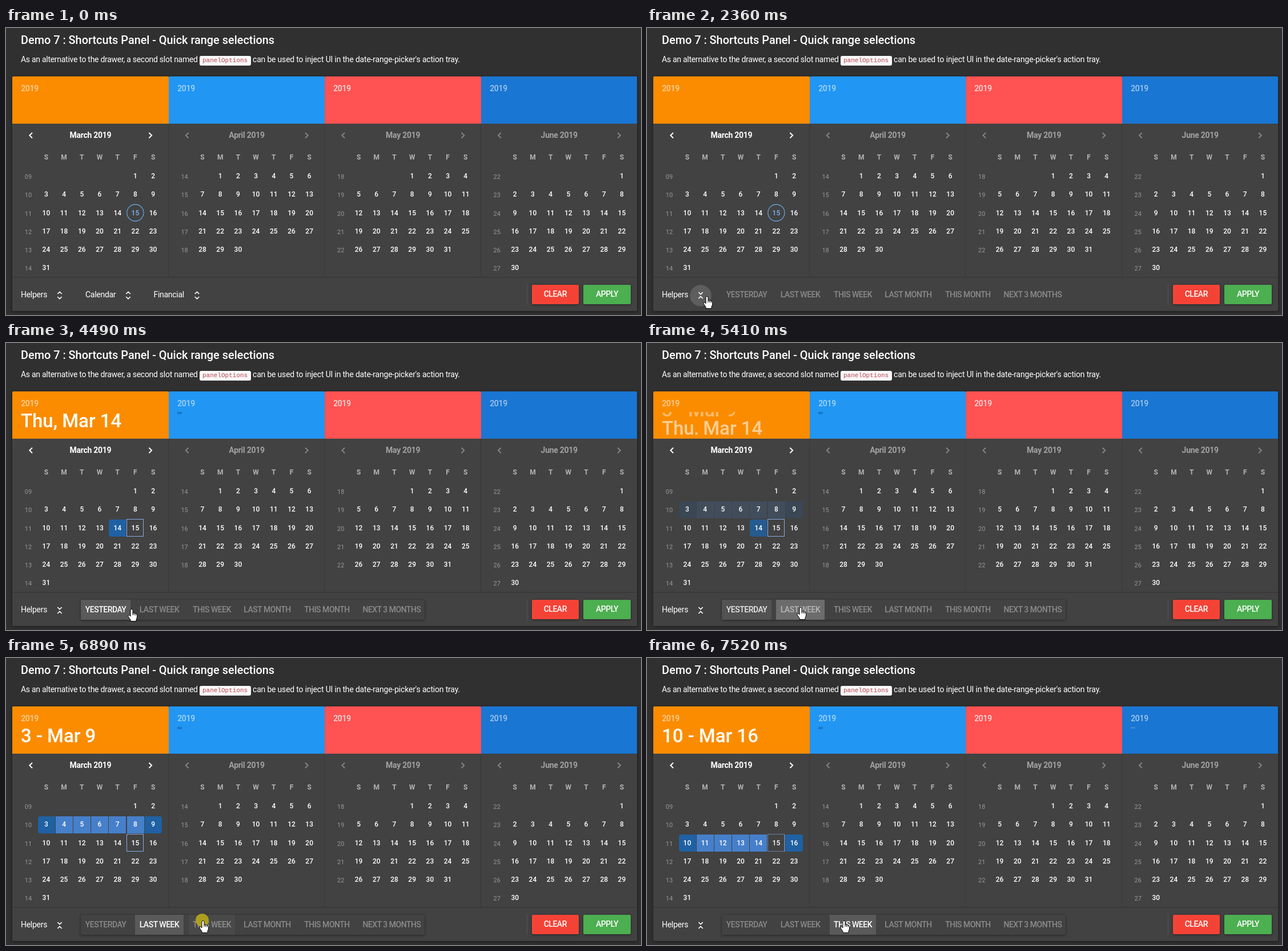
Animation, 1112 px wide and 504 px high, one loop 8 s. Source, as an HTML page:

```html
<!DOCTYPE html>
<html lang="en">
<head>
<meta charset="utf-8">
<title>Shortcuts Panel</title>
<style>
  html, body { margin: 0; width: 100%; height: 100%; overflow: hidden; background: #303030; }
  svg { display: block; width: 1112px; height: 504px; font-family: Roboto, sans-serif; fill: #fff; }
  .mid { text-anchor: middle; }
  .tight { letter-spacing: -.28px; }
  .caps { letter-spacing: -.48px; text-anchor: middle; }
  .shade { filter: drop-shadow(0 1px 2px rgba(0, 0, 0, .45)); }
  .line { fill: none; stroke: #fff; }
</style>
</head>
<body>
<svg viewBox="0 0 1112 504" xmlns="http://www.w3.org/2000/svg">
  <defs><clipPath id="titleClip"><rect x="12" y="121" width="272" height="40"/></clipPath></defs>
  <g id="base"></g>
  <g id="cells"></g>
  <g id="dates"></g>
  <g id="live"></g>
</svg>
<script>
const LOOP = 8000;
const PITCH = 273.6, COL = 31.2, ROW = 32.1;
const OPEN = 1980;
const $ = id => document.getElementById(id);
const clamp = v => Math.max(0, Math.min(1, v));
const ramp = (t, start, dur) => clamp((t - start) / dur);
const easeOut = u => 1 - (1 - u) ** 2;

const panels = [
  { name: 'March 2019', color: '#fb8c00', first: 5, days: 31, week: 9 },
  { name: 'April 2019', color: '#2196f3', first: 1, days: 30, week: 14 },
  { name: 'May 2019', color: '#ff5252', first: 3, days: 31, week: 18 },
  { name: 'June 2019', color: '#1976d2', first: 6, days: 30, week: 22 }
];

// dir: 1 enters from below, -1 from above
const picks = [
  { at: 3600, text: 'Thu, Mar 14', dir: 1, row: 2, from: 4, to: 4 },
  { at: 5340, text: '3 - Mar 9', dir: -1, row: 1, from: 0, to: 6 },
  { at: 7120, text: '10 - Mar 16', dir: 1, row: 2, from: 0, to: 6 }
];

const shortcuts = [
  ['YESTERDAY', 131, 218], ['LAST WEEK', 226, 311], ['THIS WEEK', 320, 401],
  ['LAST MONTH', 409, 506], ['THIS MONTH', 514, 610], ['NEXT 3 MONTHS', 618, 733]
];

// start, end, steps of each burst of screen updates
const bursts = [
  [0, 0, 1], [500, 820, 5], [970, 1430, 7], [1910, 2130, 4], [2290, 2360, 2],
  [2600, 3070, 6], [3240, 3320, 2], [3630, 3940, 5], [4250, 4250, 1],
  [4490, 4720, 4], [5100, 5100, 1], [5260, 5730, 7], [6050, 6050, 1],
  [6200, 6660, 7], [6890, 6890, 1], [7040, 7520, 7]
];

// time, x, y of the pointer tip
const path = [
  [500, 955, 484], [580, 720, 440], [660, 440, 414], [740, 190, 440], [820, 35, 480],
  [970, 12, 482], [1047, 45, 488], [1123, 82, 486], [1200, 102, 478], [1277, 111, 468],
  [1430, 105, 471], [2520, 105, 471], [2760, 130, 473], [2920, 190, 456], [3070, 193, 463],
  [4410, 193, 463], [4490, 220, 467], [4640, 256, 468], [4720, 269, 464], [6120, 269, 464],
  [6200, 278, 464], [6430, 332, 464], [6550, 356, 463], [6660, 345, 461]
];

const clicks = [[1910, 1980], [3320, 3630], [5100, 5260], [6890, 7040]];

function text(x, y, size, weight, str, attrs = '') {
  return `<text x="${x}" y="${y}" font-size="${size}" font-weight="${weight}" ${attrs}>${str}</text>`;
}
const centered = (x, y, size, weight, str, attrs = '') =>
  text(x, y, size, weight, str, `class="mid" ${attrs}`);
const label = (x, y, weight, str, attrs = '') => text(x, y, 14, weight, str, `class="tight" ${attrs}`);
const caps = (x, y, str, attrs = '') => text(x, y, 14, 500, str, `class="caps" ${attrs}`);
const rect = (x, y, w, h, fill, attrs = '') =>
  `<rect x="${x}" y="${y}" width="${w}" height="${h}" fill="${fill}" ${attrs}/>`;
const line = (d, width, attrs = '') => `<path class="line" d="${d}" stroke-width="${width}" ${attrs}/>`;

const edge = i => Math.round(11.2 + i * 273.5);
const colX = c => 70.4 + c * COL;
const rowY = r => 260 + r * ROW;

function unfold(x, less) {
  const [a, b] = less ? [464, 475] : [467, 472];
  const [ta, tb] = less ? [467.5, 471.5] : [463.5, 475.5];
  return line(`M${x - 3.7} ${a}L${x} ${ta}L${x + 3.7} ${a}M${x - 3.7} ${b}L${x} ${tb}L${x + 3.7} ${b}`, 1.7);
}

function drawBase() {
  let s = text(26, 28, 19.87, 500, 'Demo 7 : Shortcuts Panel - Quick range selections');
  s += label(26, 60, 400, 'As an alternative to the drawer, a second slot named');
  s += rect(339, 49, 90, 17, '#f8f9fa', 'rx="3"');
  s += text(344, 60, 11, 400, 'panelOptions', 'fill="#bd4147" font-family="Liberation Mono, monospace"');
  s += text(432, 60, 14, 400, "can be used to inject UI in the date-range-picker's action tray.", 'letter-spacing="-.19"');
  s += `<g class="shade">${rect(11, 85, 1094, 412, '#424242', 'rx="2"')}</g>`;
  panels.forEach((p, i) => {
    const x = edge(i), w = edge(i + 1) - x;
    s += rect(x, 85, w, 83, p.color, 'rx="2"') + rect(x, 90, w, 78, p.color);
    s += label(x + 15.2, 111, 500, '2019', `opacity="${i === 2 ? .8 : .6}"`);
    if (i) s += rect(x - 1, 168, 1, 270, '#393939');
  });
  s += rect(11, 437, 1094, 1, '#383838') + rect(11, 438, 1094, 1, '#3c3c3c');
  s += rect(912, 451, 1, 35, '#555');
  s += `<g class="shade">${rect(921, 451, 82, 34, '#f44336', 'rx="2"')}${rect(1011, 451, 83, 34, '#4caf50', 'rx="2"')}</g>`;
  s += caps(961.8, 472, 'CLEAR') + caps(1052.5, 472, 'APPLY');
  s += label(26, 473, 400, 'Helpers');
  return s;
}

function drawDates() {
  return panels.map((p, i) => {
    const dim = i ? .5 : 1;
    let s = label(147.9, 193, 700, p.name, `text-anchor="middle" opacity="${dim}"`);
    s += line('M46 184L41.3 188.6L46 193.2M250.4 184L255.1 188.6L250.4 193.2', 2, `opacity="${i ? .35 : 1}"`);
    [...'SMTWTFS'].forEach((d, c) => s += centered(colX(c), 231, 12, 700, d, 'opacity=".6"'));
    const rows = Math.ceil((p.first + p.days) / 7);
    for (let r = 0; r < rows; r++)
      s += centered(39, rowY(r) + 5.3, 11, 400, String(p.week + r).padStart(2, '0'), 'opacity=".45"');
    for (let d = 1; d <= p.days; d++) {
      const n = p.first + d - 1;
      if (i === 0 && d === 15) continue;
      s += centered(colX(n % 7), rowY(Math.floor(n / 7)) + 4.3, 12, 500, d);
    }
    return `<g transform="translate(${i * PITCH} 0)">${s}</g>`;
  }).join('');
}

// level of a pick: rises after its click, falls after the next
function level(i, t, delay, dur) {
  const next = picks[i + 1];
  return ramp(t, picks[i].at + delay, dur) - (next ? ramp(t, next.at + delay, dur) : 0);
}

function dayCell(c, r, left, right, fill, alpha) {
  const x = Math.round(55.6 + c * COL), y = Math.round(rowY(r)) - 14, w = 30, h = 30;
  const a = left ? 4 : 0, b = right ? 4 : 0;
  return `<path fill="${fill}" opacity="${alpha}" d="M${x + a} ${y}h${w - a - b}q${b} 0 ${b} ${b}v${h - 2 * b}` +
    `q0 ${b} ${-b} ${b}h${a + b - w}q${-a} 0 ${-a} ${-a}v${2 * a - h}q0 ${-a} ${a} ${-a}z"/>`;
}

function drawCells(t) {
  let s = '';
  picks.forEach((p, i) => {
    const alpha = level(i, t, 30, 235);
    if (alpha <= 0) return;
    for (let c = p.from; c <= p.to; c++) {
      const left = c === p.from, right = c === p.to && p.to > p.from;
      s += dayCell(c, p.row, left, right, left || right ? '#1f61a2' : '#467fca', alpha);
    }
  });
  const x = colX(5), y = rowY(2);
  if (t < 3630) {
    s += `<circle cx="${x}" cy="${y + .3}" r="14.6" fill="none" stroke="#6cb0f2" stroke-width="1.1"/>`;
    s += centered(x, y + 4.3, 12, 500, '15', 'fill="#78b2f2"');
  } else {
    const inside = level(2, t, 30, 235) > .5;
    s += rect(211.5, 309.5, 29, 30, inside ? '#424242' : 'none', `stroke="${inside ? '#6a7fa6' : '#8aabe6'}"`);
    s += centered(x, y + 4.3, 12, 500, '15');
  }
  return s;
}

function drawTitle(t) {
  const s = picks.map((p, i) => {
    const next = picks[i + 1];
    const enter = easeOut(ramp(t, p.at, 330));
    const leave = next ? easeOut(ramp(t, next.at, 330)) : 0;
    const alpha = enter * (1 - leave);
    if (!alpha) return '';
    const y = 148 + 32 * (p.dir * (1 - enter) - (next ? next.dir * leave : 0));
    return text(26, y, 33, 500, p.text, `opacity="${alpha}"`);
  }).join('');
  let marks = '';
  if (t >= 3930) marks += rect(300, 121, 8, 4, '#1a78c8');
  if (t >= 7500) marks += rect(847, 121, 8, 3, '#3f87d6');
  return `<g clip-path="url(#titleClip)">${s}</g>${marks}`;
}

function drawTray(t, x) {
  if (t < OPEN)
    return unfold(94, false) + label(139, 473, 400, 'Calendar') + unfold(214, false) +
      label(258.5, 473, 400, 'Financial') + unfold(334.5, false);
  const focus = (t < 2290 ? .2 : .15) * (1 - ramp(t, 3630, 230));
  let s = `<circle cx="94" cy="470" r="18.8" opacity="${focus}"/>` + unfold(94, true);
  if (t >= 3630) s += `<g class="shade">${rect(131, 451, 602, 35, '#424242', 'rx="2"')}</g>`;
  const shown = ramp(t, OPEN - 70, 200);
  shortcuts.forEach(([name, a, b], i) => {
    let on = 0, glow = 0;
    if (i < picks.length) {
      const since = t - picks[i].at + 80;
      on = level(i, t, 0, 360);
      glow = since >= 0 ? .3 * clamp(1 - since / 400) : 0;
    }
    const hover = t > 3000 && x > a && x < b ? .04 * (1 - on) : 0;
    s += rect(a, 451, b - a, 35, '#fff', `opacity="${.13 * on * on + glow + hover}"`);
    s += caps((a + b) / 2, 473, name, `opacity="${shown * (.38 + .62 * on)}"`);
  });
  return s;
}

function pointerAt(t) {
  let i = 0;
  while (i < path.length - 1 && path[i + 1][0] <= t) i++;
  const [t0, x0, y0] = path[i], [t1, x1, y1] = path[i + 1] || path[i];
  const u = t1 > t0 ? ramp(t, t0, t1 - t0) : 0;
  return [x0 + (x1 - x0) * u, y0 + (y1 - y0) * u];
}

function drawPointer(t, x, y) {
  if (t < 500) return '';
  const hand = 'M-2 1.5Q0 -1.2 2 1.5V7.2L4.5 7L6.5 8L8.5 8.5L9.6 10.5V15L8 18.5V21.5H-1.8V19.5L-6 13.2Q-6.6 10.6 -4.2 10.8L-2 13Z';
  const arrow = 'M0 0V16L3.7 12.6L6.3 18.6L8.8 17.5L6.2 11.7H11.2Z';
  const isHand = t > 1040;
  const knuckles = isHand ? '<path d="M2 7V11M4.6 7.5V11M7.2 8.5V11.5" fill="none"/>' : '';
  let s = '';
  if (clicks.some(([a, b]) => t >= a && t < b))
    s += `<circle cx="${x - 1.5}" cy="${y - .5}" r="11.5" fill="#b3a41c" opacity=".95"/>`;
  return s + `<g transform="translate(${x} ${y})" stroke="#000" stroke-width="1"><path d="${isHand ? hand : arrow}"/>${knuckles}</g>`;
}

// hold the picture between updates of a burst
function snap(t) {
  const now = t + 8;
  const [a, b, n] = bursts.filter(q => q[0] <= now).pop();
  if (n === 1) return a;
  const step = (b - a) / (n - 1);
  return a + step * Math.min(n - 1, Math.floor((now - a) / step));
}

let last = -1;
function render(time) {
  const t = snap(time % LOOP);
  if (t === last) return;
  last = t;
  const [x, y] = pointerAt(t);
  $('cells').innerHTML = drawCells(t);
  $('live').innerHTML = drawTitle(t) + drawTray(t, x) + drawPointer(t, x, y);
}

$('base').innerHTML = drawBase();
$('dates').innerHTML = drawDates();
const begin = performance.now();
function tick() {
  render(performance.now() - begin);
  requestAnimationFrame(tick);
}
tick();
</script>
</body>
</html>
```
